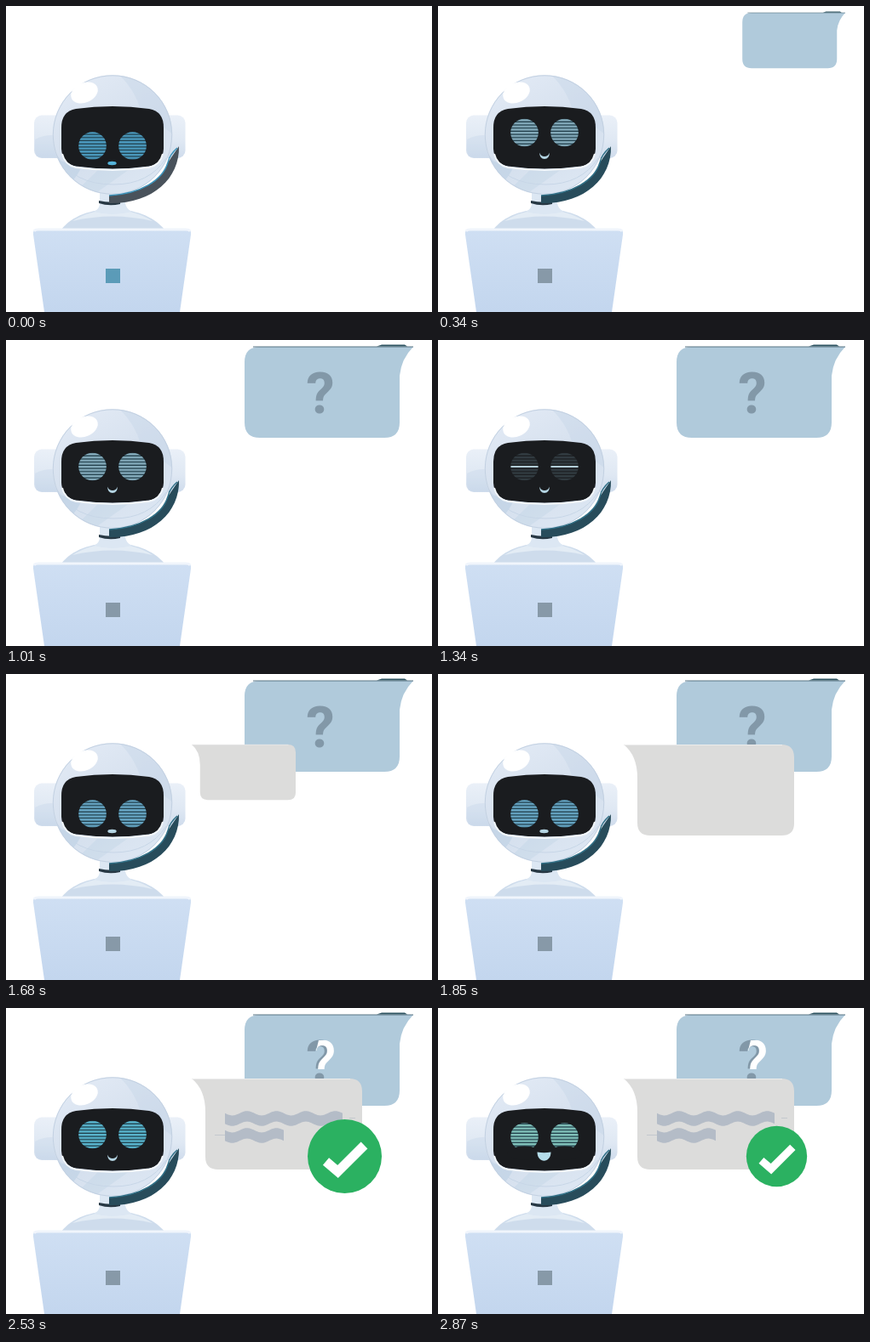
Animation of 500x360 px, one loop 3.5 s. Source, as an HTML page:

```html
<!DOCTYPE html>
<html lang="en">
<head>
<meta charset="utf-8">
<title>Robot helper</title>
<style>
html, body { margin: 0; width: 100%; height: 100%; overflow: hidden; background: #fff; }
svg { display: block; width: 500px; height: 360px; }
</style>
</head>
<body>
<svg id="stage" viewBox="0 0 500 360">
  <defs>
    <linearGradient id="shell" x1=".2" y1="0" x2=".75" y2="1">
      <stop offset="0" stop-color="#e2eaf5"/><stop offset=".55" stop-color="#d4dfed"/><stop offset="1" stop-color="#dde7f3"/>
    </linearGradient>
    <linearGradient id="ear" x2="0" y2="1">
      <stop offset="0" stop-color="#eaf0f8"/><stop offset=".6" stop-color="#dfe8f3"/><stop offset="1" stop-color="#cfdcec"/>
    </linearGradient>
    <linearGradient id="lid" x2="0" y2="1">
      <stop offset="0" stop-color="#cfdff3"/><stop offset="1" stop-color="#c3d6ee"/>
    </linearGradient>
    <pattern id="stripes" width="4" height="3.7" patternUnits="userSpaceOnUse">
      <rect width="4" height="2.4" fill="currentColor"/>
    </pattern>
    <clipPath id="headClip"><circle cx="125" cy="151.500" r="70"/></clipPath>
    <clipPath id="shine"><path d="M367 38H392V74H362V58Z"/></clipPath>
  </defs>

  <!-- question bubble -->
  <g id="ask">
    <path d="M298 8H478Q464 22 462 42V97Q462 115 444 115H298Q280 115 280 97V26Q280 8 298 8Z" fill="#b0cadb"/>
    <path d="M290 8H478" stroke="#587483" stroke-width="1"/>
    <path d="M435 7.500L441 5.500H468L471 7.500Z" fill="#2f5563"/>
    <g id="mark" font-family="Roboto, Arial, sans-serif" font-weight="700" font-size="67" text-anchor="middle">
      <text x="369" y="85.500" fill="#8298a8">?</text>
      <text id="gleam" x="371" y="86" fill="#fff" font-weight="500" clip-path="url(#shine)">?</text>
    </g>
  </g>

  <!-- reply bubble -->
  <g id="reply">
    <path d="M218 83H403Q418 83 418 98V176Q418 190 403 190H249Q234 190 234 175V122Q234 96 218 83Z" fill="#dcdcdb"/>
    <path d="M219 83.500H404" stroke="#ececec"/>
    <g id="lines" fill="#b4bcc7">
      <path id="wave1"/><path id="wave2"/>
      <path d="M245 149.500H257M403 129.500H410" stroke="#c3c8cd"/>
    </g>
  </g>

  <g id="check">
    <circle r="43.500" fill="#2bb161"/>
    <path d="M-22 6L-8 18L23 -13" fill="none" stroke="#fff" stroke-width="11"/>
  </g>

  <!-- robot -->
  <rect x="33" y="128.500" width="36" height="50.500" rx="9" fill="url(#ear)"/>
  <rect x="180" y="128.500" width="30.500" height="50.500" rx="9" fill="url(#ear)"/>
  <path d="M34 157Q48 150 62 153V178H42Q34 178 34 168Z" fill="#c4d5e9" opacity=".35"/>
  <path d="M65 263C77 247 100 239 125 239S173 247 186 263Z" fill="#cedcec"/>
  <path d="M78 253Q98 240 125 240T172 253Q125 242 78 253Z" fill="#e3ecf5"/>
  <path d="M110 216H140V232Q141 239 148 242Q125 248 103 242Q110 239 110 232Z" fill="#dce7f3"/>
  <path d="M109 229Q121 232 134 230V233Q121 236 109 232Z" fill="#273844"/>

  <circle cx="125" cy="151.500" r="70.300" fill="url(#shell)"/>
  <g clip-path="url(#headClip)">
    <path d="M132 80Q151 98 158 122L196 151V105L165 76Z" fill="#c5d4e6" opacity=".45"/>
    <path d="M54 178L88 191Q80 206 69 215L48 207Z" fill="#bdd0e5" opacity=".6"/>
    <path d="M108 193L145 192L100 224H76Z" fill="#bfd1e4" opacity=".4"/>
    <path d="M60 176Q79 210 126 210Q168 210 188 179" fill="none" stroke="#c7d6e7"/>
  </g>
  <circle cx="125" cy="151.500" r="69.700" fill="none" stroke="#c3d1e2" stroke-width="1"/>
  <ellipse cx="92" cy="102" rx="16.500" ry="11.500" fill="#fff" transform="rotate(-24 92 102)"/>

  <path id="boom" d="M203 165C204 203 172 233 121 232V223C158 221 185 205 190 184Z"/>
  <path id="boomEdge" d="M201 167Q192 175 190 184C184 205 158 221 121 223" fill="none" stroke-width="1.500"/>

  <path d="M65 143Q65 124 82 121Q125 115 168 121Q185 124 185 143V168Q184 185 168 188.500Q125 194.500 82 188.500Q66 185 65 168Z" fill="#1a1c1f"/>
  <path d="M66 174Q69 187 82 190Q125 196 168 190Q181 187 184 174" fill="none" stroke="#f2f7fb" stroke-width="2"/>
  <g id="eyes"></g>
  <g id="mouth">
    <ellipse id="oval" cx="124.500" cy="185" rx="5.200" ry="2.200"/>
    <path id="smile" d="M119 172.500Q119.500 180 125 180T131 172.500Q129 177 125 177T119 172.500Z"/>
    <path id="grin" d="M116.500 169.500Q124.500 171 132.500 169.500C132.500 183 116.500 183 116.500 169.500Z"/>
  </g>

  <!-- laptop -->
  <path d="M38 262H211Q218 262 217 269L204 360H45L32 269Q31 262 38 262Z" fill="url(#lid)"/>
  <path d="M33 265Q34 263 38 263H211Q215 263 216 265" fill="none" stroke="#f0f5fc" stroke-width="3"/>
  <rect id="badge" x="117" y="309" width="17" height="17"/>
</svg>
<script>
const LOOP = 3500;
const $ = id => document.getElementById(id);
const show = (id, on) => $(id).style.display = on ? '' : 'none';
const paint = (id, name, value) => $(id).setAttribute(name, value);

// Wavy band of even height with upright ends
function wave(y, x0, cycles) {
  const length = cycles * 34.5, top = [], bottom = [];
  for (let x = 0; x <= length; x++) {
    const mid = y + 2.6 * Math.sin(x / 34.5 * 2 * Math.PI);
    top.push(`${x0 + x} ${mid - 6.2}`);
    bottom.unshift(`${x0 + x} ${mid + 6.2}`);
  }
  return 'M' + top.concat(bottom).join('L') + 'Z';
}
paint('wave1', 'd', wave(130, 257, 4));
paint('wave2', 'd', wave(150, 257, 2));

// Latest entry that has started: [start, value]
const at = (steps, t) => steps.reduce((v, [start, value]) => t >= start ? value : v, steps[0][1]);

const askSize = [[0, 0], [340, .61], [670, 1]];
const replySize = [[0, 0], [1680, .61], [1850, 1]];
const checkSize = [[0, 0], [2360, .55], [2530, 1], [2700, .9], [2870, .82]];
const eyeMood = [[0, 'open'], [1340, 'dim'], [1510, 'open'], [2020, 'shut'], [2190, 'open'], [2870, 'happy']];
const eyeLevel = [[0, 164.5], [340, 149], [1510, 164.5], [2190, 149], [2870, 151.5]];
const glow = [[0, '#4c9cc1'], [340, '#86adbd'], [1510, '#69a9c8'], [2190, '#59b6cf'], [2870, '#82c4bc']];

function eye(x, y, mood) {
  const disc = `<circle cx="${x}" cy="${y}" r="16.300" `;
  const bar = `<path d="M${x - 16} ${y}H${x + 16}" stroke="#b3ced8" stroke-width="1.800"/>`;
  if (mood == 'shut')
    return bar + (x < 125 ? `<path d="M${x - 8} ${y - 10}H${x + 11}M${x - 8} ${y - 7}H${x + 11}" stroke="#30444f"/>` : '');
  if (mood == 'dim')
    return disc + 'fill="url(#stripes)" opacity=".22"/>' + bar;
  const eyeball = disc + 'fill="#1e3b47"/>' + disc + 'fill="url(#stripes)"/>';
  return mood == 'happy'
    ? eyeball + `<ellipse cx="${x}" cy="${y + 19}" rx="20" ry="8" fill="#1a1c1f"/>`
    : eyeball;
}

function scaleAt(id, size, x, y) {
  show(id, size > 0);
  paint(id, 'transform', `translate(${x} ${y}) scale(${size}) translate(${-x} ${-y})`);
}

function draw(t) {
  const y = at(eyeLevel, t), mood = at(eyeMood, t);
  const down = y > 160, fresh = t < 340, happy = mood == 'happy';

  scaleAt('ask', at(askSize, t), 478, 8);
  show('mark', t >= 670);
  show('gleam', t >= 2360);
  scaleAt('reply', at(replySize, t), 218, 83);
  show('lines', t >= 2020);

  const size = at(checkSize, t);
  show('check', size > 0);
  paint('check', 'transform', `translate(397.500 174.500) scale(${size})`);

  $('stage').style.color = at(glow, t);
  $('eyes').innerHTML = eye(101.5, y, mood) + eye(148.5, y, mood);
  show('oval', down);
  show('smile', !down && !happy);
  show('grin', happy);
  paint('mouth', 'fill', fresh ? '#55b3da' : happy ? '#b5ddea' : '#b4d4e2');

  paint('boom', 'fill', fresh ? '#49525b' : '#284c5b');
  paint('boomEdge', 'stroke', fresh ? '#3b91b8' : '#2f6f86');
  paint('badge', 'fill', fresh ? '#5b9bb8' : '#8799a8');
}

const start = performance.now();
function tick() {
  draw((performance.now() - start) % LOOP);
  requestAnimationFrame(tick);
}
tick();
</script>
</body>
</html>
```
